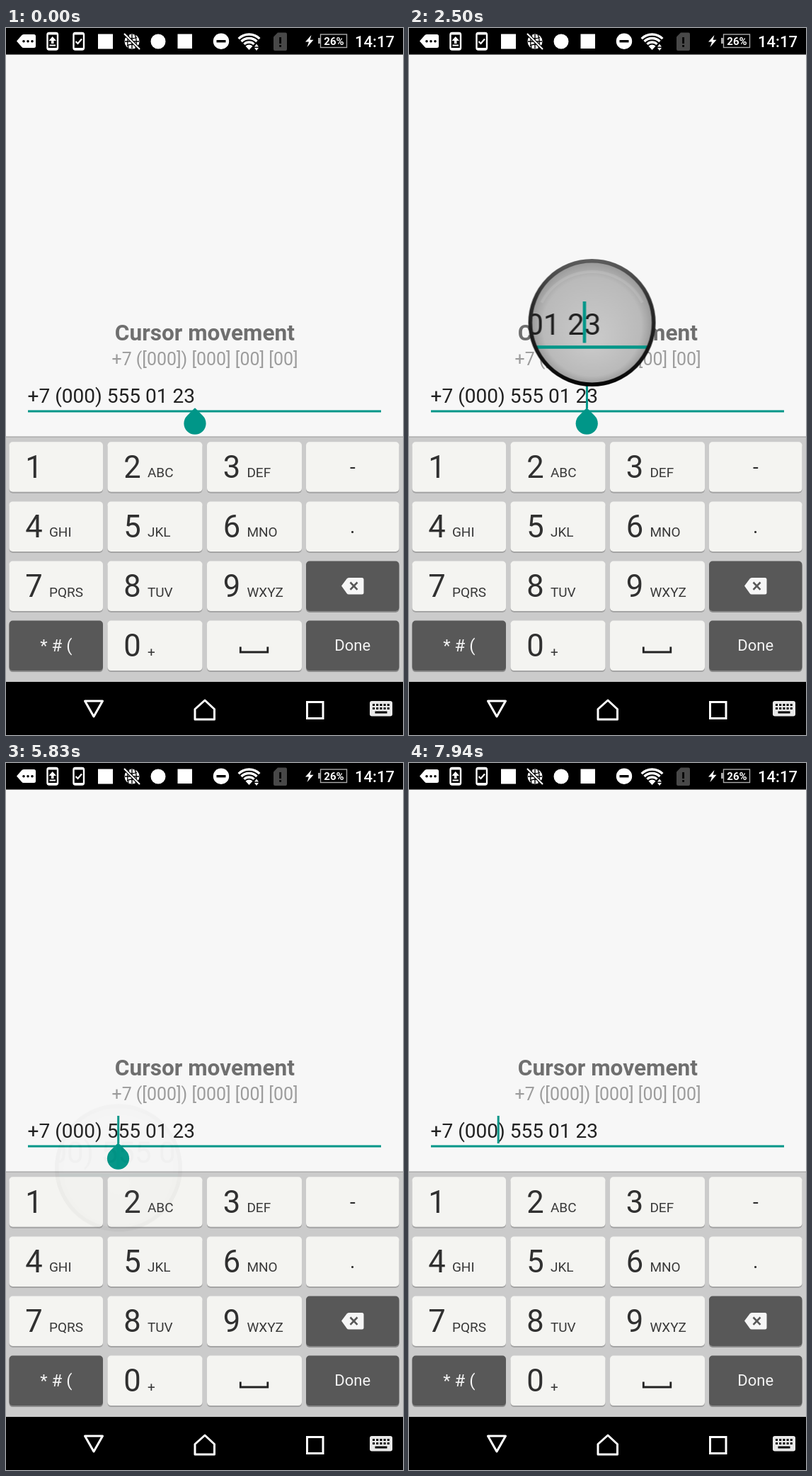
Animation, 561 px wide and 998 px high, one loop 8000 ms. Source, as an HTML page with a canvas:

```html
<!DOCTYPE html>
<html lang="en">
<head>
<meta charset="utf-8">
<title>Cursor movement</title>
<style>
html, body { margin: 0; width: 100%; height: 100%; overflow: hidden; background: #000; }
canvas { display: block; width: 561px; height: 998px; }
</style>
</head>
<body>
<canvas id="stage" width="561" height="998"></canvas>
<script>
const ctx = document.getElementById('stage').getContext('2d');
const LOOP = 8000;
const TEAL = '#009688';
const NUMBER = '+7 (000) 555 01 23';
const NUMBER_FONT = '400 28.05px Roboto, sans-serif';
const LEFT = 30.5;
const ZOOM = 1.5;

// Caret: time, position in the number, visible
const caretKeys = [
  [0, 18, 0], [500, 18, 1], [1000, 18, 0], [1500, 18, 1], [2000, 18, 0],
  [2170, 18, 1], [2500, 17, 1], [2720, 16, 1], [3830, 16, 0], [4050, 15, 1],
  [4550, 15, 0], [5050, 15, 1], [5550, 10, 1], [6380, 9, 1], [7330, 9, 0],
  [7390, 8, 1], [7800, 7, 1]
];
const handleKeys = [[0, 18], [2500, 17], [2720, 16], [5550, 10], [6380, 9]];
const handleAlpha = [
  [60, 1], [330, 0], [1500, 0], [1720, 1], [4110, 1], [4330, 0],
  [5500, 0], [5720, 1], [7440, 1], [7680, 0]
];
const lenses = [
  { from: 2165, to: 3440,
    x: [[2170, 266], [2400, 263], [2940, 239]], y: [[2170, 416]] },
  { from: 5826, to: 6950,
    x: [[5830, 159], [6050, 158], [6330, 148], [6500, 140], [6780, 148]],
    y: [[5990, 432], [6400, 442]] }
];

const clamp = v => Math.max(0, Math.min(1, v));

function step(keys, t) {
  return keys.reduce((last, key) => key[0] <= t ? key : last);
}

function tween(keys, t) {
  const i = keys.findIndex(key => key[0] > t);
  if (i === 0) return keys[0][1];
  if (i < 0) return keys[keys.length - 1][1];
  const [t0, a] = keys[i - 1], [t1, b] = keys[i];
  return a + (b - a) * (t - t0) / (t1 - t0);
}

function text(str, x, y, size, color, align = 'left', weight = 400) {
  ctx.font = `${weight} ${size}px Roboto, sans-serif`;
  ctx.textAlign = align;
  ctx.fillStyle = color;
  ctx.fillText(str, x, y);
}

function rect(x, y, w, h, color, r = 0) {
  ctx.fillStyle = color;
  ctx.beginPath();
  ctx.roundRect(x, y, w, h, r);
  ctx.fill();
}

function disc(x, y, r, color) {
  ctx.fillStyle = color;
  ctx.beginPath();
  ctx.arc(x, y, r, 0, 2 * Math.PI);
  ctx.fill();
}

function shape(d, color) {
  ctx.fillStyle = color;
  ctx.fill(new Path2D(d));
}

function line(d, width, color) {
  ctx.lineWidth = width;
  ctx.strokeStyle = color;
  ctx.stroke(new Path2D(d));
}

function caretX(index) {
  ctx.font = NUMBER_FONT;
  return LEFT + ctx.measureText(NUMBER.slice(0, index)).width;
}

function drawPhone(x) {
  ctx.lineWidth = 2.4;
  ctx.strokeStyle = '#fff';
  ctx.beginPath();
  ctx.roundRect(x, 7, 14.5, 23.5, 2.5);
  ctx.stroke();
  rect(x, 6.5, 14.5, 3, '#fff', 1);
  rect(x, 28, 14.5, 3, '#fff', 1);
}

function drawStatusBar() {
  const white = '#fff', black = '#000';
  rect(0, 0, 561, 37.5, black);

  shape('M15 18.5 L22 10.5 Q23 9 25 9 H39.5 Q42 9 42 11.5 V25.5 Q42 28 39.5 28 H25 Q23 28 22 26.5 Z', white);
  for (const x of [25, 31, 37]) disc(x, 18.7, 1.8, black);

  drawPhone(58.5);
  shape('M65.7 12 L71 18 H67.5 V22 H64 V18 H60.5 Z', white);
  rect(61.5, 23.5, 8.5, 2, white);
  drawPhone(95.5);
  line('M98.5 19 L101.5 22 L107 15.5', 2.2, white);

  rect(130, 8.5, 21, 21, white);

  disc(178, 19, 10.5, white);
  line('M168 19 H188 M178 9 V29 M171 13 Q178 17 185 13 M171 25 Q178 21 185 25', 1.4, black);
  line('M173 28 Q170 19 174 9 M183 28 Q186 19 182 9', 1.3, black);
  line('M167 8 L189 30', 4.5, black);
  line('M167 8 L189 30', 2.2, white);

  disc(215, 19, 10.5, white);
  rect(242.5, 8.5, 20.5, 20.5, white);

  disc(304, 18.7, 11.2, white);
  rect(297.5, 17, 13, 3.4, black);

  for (const r of [21, 15.5, 10]) {
    ctx.lineWidth = 3.3;
    ctx.strokeStyle = white;
    ctx.beginPath();
    ctx.arc(343.5, 30, r, -Math.PI * 0.75, -Math.PI * 0.25);
    ctx.stroke();
  }
  shape('M343.5 31 L338.5 25.5 Q343.5 21.5 348.5 25.5 Z', white);
  shape('M351 26.5 L354 22.5 L357 26.5 Z M351 28 H357 L354 32 Z', white);

  shape('M384 6.5 H395 Q397 6.5 397 8.5 V30 Q397 32 395 32 H380 Q378 32 378 30 V12.5 Z', '#484848');
  rect(386.2, 13, 2.8, 9, black);
  rect(386.2, 24, 2.8, 2.8, black);

  shape('M431.5 10 L423 19.5 H428 L425.5 27 L434.5 16.8 H429.5 Z', white);
  ctx.lineWidth = 1.4;
  ctx.strokeStyle = '#aaa';
  ctx.strokeRect(444.5, 9, 37, 18.5);
  rect(441, 14, 3, 8, '#aaa');
  text('26%', 463.5, 23.7, 15, white, 'center', 700);
  text('14:17', 521, 27, 22, white, 'center', 500);
}

function drawNavBar() {
  rect(0, 923, 561, 75, '#000');
  ctx.lineJoin = 'round';
  line('M111.5 950 H136.5 L124 972 Z', 3, '#fff');
  line('M281 949 L294.5 961.5 V976 H267 V961.5 Z', 3, '#fff');
  ctx.lineJoin = 'miter';
  line('M425.5 951.5 H448 V974.5 H425.5 Z', 3, '#fff');

  rect(514, 950, 32, 21.5, '#e8e8e8', 3);
  for (let row = 0; row < 2; row++)
    for (let col = 0; col < 5; col++)
      rect(518 + col * 5.2, 954 + row * 5, 3, 3, '#000');
  rect(521.5, 964.5, 17, 3, '#000');
}

const columns = [[4.5, 132.5], [143.5, 134], [284, 134], [424, 131.5]];
const keyRows = [
  ['1', '2 ABC', '3 DEF', '-'],
  ['4 GHI', '5 JKL', '6 MNO', '.'],
  ['7 PQRS', '8 TUV', '9 WXYZ', 'back'],
  ['* # (', '0 +', 'space', 'Done']
];

function drawKey(label, x, y, w) {
  const dark = ['back', '* # (', 'Done'].includes(label);
  const mid = x + w / 2;
  rect(x, y + 2, w, 70.5, dark ? '#8a8a8a' : '#a4a4a4', 5);
  rect(x, y, w, 70.5, dark ? '#585858' : '#f4f4f1', 5);

  if (label === 'back') {
    shape('M474 787.5 L481.5 777.5 Q482.5 776 484.5 776 H503 Q505.5 776 505.5 778.5 V797 Q505.5 799.5 503 799.5 H484.5 Q482.5 799.5 481.5 798 Z', '#f6f6f6');
    line('M486.5 782.5 L496.5 792.8 M496.5 782.5 L486.5 792.8', 2.6, '#585858');
  } else if (label === 'space') {
    line('M331.3 873.5 V881 H369.8 V873.5', 2.8, '#222');
  } else if (label === 'Done') {
    text(label, mid, y + 42, 22, '#f4f4f4', 'center');
  } else if (dark) {
    text(label, mid, y + 43, 24, '#f4f4f4', 'center');
  } else if (label === '-' || label === '.') {
    text(label, mid, y + 45, 28, '#2b2b2b', 'center');
  } else {
    const [digit, letters = ''] = label.split(' ');
    text(digit, x + 22.8, y + 50.5, 43.5, '#303030');
    text(letters, x + 56.4, y + 50, 19, '#383838');
  }
}

function drawKeyboard() {
  rect(0, 577, 561, 346, '#cbcbcb');
  rect(0, 576.5, 561, 1.3, '#a2a2a2');
  keyRows.forEach((row, r) => row.forEach((label, c) =>
    drawKey(label, columns[c][0], 584.3 + r * 84.1, columns[c][1])));
}

// Number, underline and caret; also drawn magnified inside the lens
function drawField(g, t) {
  const [, index, shown] = step(caretKeys, t);
  const x = caretX(index);
  g.font = NUMBER_FONT;
  g.textAlign = 'left';
  g.fillStyle = '#212121';
  g.fillText(NUMBER, LEFT, 529);
  g.fillStyle = TEAL;
  g.fillRect(31, 539.5, 499, 3);
  if (shown) g.fillRect(x - 1.3, 498, 3, 39);
}

function drawHandle(t) {
  const x = caretX(step(handleKeys, t)[1]);
  ctx.save();
  ctx.globalAlpha = tween(handleAlpha, t);
  ctx.translate(x, 558.2);
  ctx.rotate(Math.PI / 4);
  rect(-15.6, -15.6, 31.2, 31.2, TEAL, [1, 15.6, 15.6, 15.6]);
  ctx.restore();
}

// The lens is composed on its own layer so that it fades as one piece
const layer = document.createElement('canvas');
layer.width = layer.height = 190;
const lensCtx = layer.getContext('2d');

function gradient(fill, stops) {
  stops.forEach(([at, color]) => fill.addColorStop(at, color));
  return fill;
}

const glass = gradient(lensCtx.createRadialGradient(0, 22, 15, 0, 0, 88),
  [[0, '#c8c8c8'], [0.75, '#bababa'], [1, '#969696']]);
const rim = gradient(lensCtx.createLinearGradient(0, -90, 0, 90),
  [[0, '#5e5e5e'], [0.35, '#2c2c2c'], [1, '#060606']]);

function drawLens(t, lens) {
  if (t < lens.from || t >= lens.to) return;
  const enter = clamp((t - lens.from) / 170);
  const leave = clamp((t - lens.to + 140) / 140);
  const x = tween(lens.x, t);
  const rest = tween(lens.y, t);
  const y = rest + 148 * (1 - enter) ** 2 + 141 * leave ** 3;

  const g = lensCtx;
  g.clearRect(0, 0, 190, 190);
  g.save();
  g.translate(95, 95);

  g.save();
  g.beginPath();
  g.arc(0, 0, 87, 0, 2 * Math.PI);
  g.clip();
  g.fillStyle = glass;
  g.fillRect(-90, -90, 180, 180);
  g.lineWidth = 4;
  g.strokeStyle = 'rgba(255,255,255,.12)';
  g.beginPath();
  g.arc(0, 8, 80, -Math.PI * 0.85, -Math.PI * 0.15);
  g.stroke();
  g.scale(ZOOM, ZOOM);
  g.translate(-x, -(rest + 102));
  drawField(g, t);
  g.restore();

  g.lineWidth = 5.5;
  g.strokeStyle = rim;
  g.beginPath();
  g.arc(0, 0, 87.2, 0, 2 * Math.PI);
  g.stroke();
  g.restore();

  ctx.save();
  ctx.globalAlpha = enter * (1 - leave);
  ctx.drawImage(layer, x - 95, y - 95);
  ctx.restore();
}

function render(t) {
  rect(0, 0, 561, 998, '#f7f7f7');
  text('Cursor movement', 280.8, 440.5, 31.6, '#6f6f6f', 'center', 700);
  text('+7 ([000]) [000] [00] [00]', 281, 476, 24.93, '#9c9c9c', 'center');
  drawField(ctx, t);
  drawKeyboard();
  drawStatusBar();
  drawNavBar();
  drawHandle(t);
  lenses.forEach(lens => drawLens(t, lens));
}

function frame() {
  render(performance.now() % LOOP);
  requestAnimationFrame(frame);
}
frame();
</script>
</body>
</html>
```
